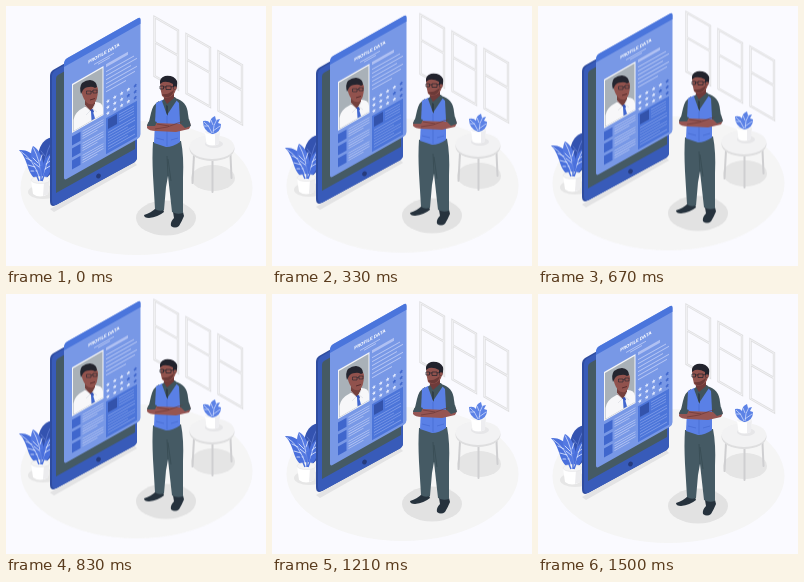
Recreate the animation shown at these times as an HTML page. Size 260 px wide and 260 px high, loop 1.54 s.

```html
<!DOCTYPE html>
<html lang="en">
<head>
<meta charset="utf-8">
<title>Profile data</title>
<style>
html, body { margin: 0; width: 100%; height: 100%; overflow: hidden; background: #fafaff; }
svg { display: block; width: 100vw; height: 100vh; }
</style>
</head>
<body>
<svg viewBox="0 0 260 260">
  <g id="scene">
    <ellipse cx="130.500" cy="182" rx="116" ry="67" fill="#f5f5f5"/>
    <g id="windows" fill="none"></g>

    <!-- shadows -->
    <path d="M44 203l4 3 83-47-3-3z" fill="#e3e3e4"/>
    <ellipse cx="37" cy="186" rx="15" ry="7" fill="#e6e6e6"/>
    <ellipse cx="207" cy="172" rx="22" ry="13" fill="#e5e5e5"/>
    <ellipse cx="160" cy="212" rx="30" ry="17.500" fill="#e2e2e2"/>

    <!-- left plant -->
    <g stroke-linecap="round" fill="none">
      <path d="M36 172C29 160 30 137 43 132q3-1 5 0v30q-4 8-9 11z" fill="#3453b0"/>
      <path d="M37 171q1-21 8-34M37 158l-5-5M39 150l-4-5" stroke="#7f99e8" stroke-width=".5"/>
      <path d="M34 174C20 172 24 155 13 144c14-1 22 11 22 30z" fill="#4a70dc"/>
      <path d="M35 174C27 166 22 149 27 140c9 5 13 20 10 34z" fill="#5479e2"/>
      <path d="M36 174C34 163 37 153 45 147c4 8 1 20-7 27z" fill="#4a70dc"/>
      <path d="M34 173Q28 154 15 145.500M36 173Q34 154 27.500 142M37.500 172q2-14 6.500-22" stroke="#e4ebff" stroke-width=".7"/>
      <path d="M29 161l-7-2M26 155l-6-3M31 165l-6 0M32 157l-5-5M33 161l-5-4M34 155l2-6M39 163l5-3M40 158l4-3" stroke="#e4ebff" stroke-width=".8"/>
    </g>
    <path d="M25 174l2 14q7 5 15 0l2-14z" fill="#fff"/>
    <path d="M38 176l-1 14q4-1 5-2l2-14z" fill="#ececee"/>
    <ellipse cx="34.500" cy="174" rx="9.500" ry="3.500" fill="#f4f4f5" stroke="#e4e4e6" stroke-width=".6"/>
    <path d="M33 175l-5-12M35 175V160M36 175l4-11" stroke="#4a70dc" stroke-width="1.500" fill="none"/>

    <!-- tablet -->
    <path d="M44 70q0-4 3-6L126 19q5-2 5 3V151q0 4-4 6L50 199q-6 3-6-4z" fill="#2f4c9f"/>
    <path d="M46 70.500q0-4 3-6L126 21q5-2 5 3V151q0 4-4 6L51 198.500q-5 2-5-4z" fill="#385bb9"/>
    <path d="M50 73q0-3 2-4L129 25V143L50 187z" fill="#455a64"/>
    <ellipse cx="92.500" cy="170" rx="2.200" ry="2.600" fill="#263b7c" transform="rotate(25 92.500 170)"/>

    <!-- floating profile sheet, drawn flat and skewed -->
    <g transform="matrix(1 -.566 0 1 58 54)">
      <rect width="76.500" height="120.500" rx="3" fill="#7898e6"/>
      <path d="M0 7V3q0-3 3-3H73.500q3 0 3 3V7z" fill="#4a75dc"/>
      <text x="40" y="17.500" text-anchor="middle" font-family="Inter, Roboto, sans-serif" font-weight="700" font-size="4.500" fill="#fff">PROFILE DATA</text>
      <path d="M30 21.500H50M34 23.500H46" stroke="#c3d0f6" stroke-width=".7"/>
      <g id="sheet"></g>
    </g>

    <!-- portrait -->
    <path d="M66 78L97.500 60V109L66 127z" fill="#f4f5f8"/>
    <path d="M67 79L96.500 62V108.500L67 125.500z" fill="#a9b1b8"/>
    <path d="M67.500 125v-11q1-8 11-13l11-5q7 0 7.500 6v6z" fill="#f7f7f9"/>
    <path d="M79 92l10-2v8l-4 7-6-5z" fill="#74403d"/>
    <path d="M75 83q2-5 9-6 7 0 8 6 0 12-5 15-4 1-7-2-4-5-5-13z" fill="#91524d"/>
    <path d="M75 88q-2-7 1-11 4-3 8-3 7 1 7 7l-2 1q-3-2-6-1-4 0-6 3z" fill="#24252f"/>
    <path d="M80.500 85h4.500v3h-4.500zM87 84h4v3h-4zM85 86l2-1" fill="none" stroke="#24252f" stroke-width=".6"/>
    <path d="M84 94l5-1.500" stroke="#4b2527" stroke-width=".8"/>
    <path d="M84 104l3-1 1 3-2 1z" fill="#2f4fb5"/>
    <path d="M85 106l2-.500 2 7-3.500 2z" fill="#4268cf"/>
    <path d="M79 99l5 6-4 4M89 98l-2 5 4 3" fill="none" stroke="#d5d8df" stroke-width=".6"/>

    <!-- table and its plant -->
    <g stroke="#cfcfd1" stroke-width="2" stroke-linecap="round">
      <path d="M188 149l-1.500 28M206.500 154v32M224.500 149l1 23"/>
    </g>
    <ellipse cx="206" cy="143" rx="22.500" ry="12" fill="#dededf"/>
    <ellipse cx="206" cy="141" rx="22.500" ry="12" fill="#f2f2f3"/>
    <ellipse cx="208" cy="138" rx="9" ry="4" fill="#e6e6e8"/>
    <path d="M199 126l1.500 12q6 3 12 0l1.500-12z" fill="#fff"/>
    <path d="M209 127v12q3 0 4-1l1-12z" fill="#ededf0"/>
    <ellipse cx="206.500" cy="126" rx="7.500" ry="2.500" fill="#f3f3f5"/>
    <path d="M206 128q-9-3-9-13 5-1 7 2 0-5 5-7l1 4 4-1-2 4 3 1q0 8-8 10z" fill="#5c82e6"/>
    <path d="M206 127q-3-8-8-11M207 127q0-8 4-14M207 125l7-5M198 120l5 0M205 114l2 5" stroke="#dbe4ff" stroke-width=".7" fill="none"/>

    <!-- man -->
    <path d="M150 202l7 1 1 3q-6 5-15 6-5 0-5-3 7-2 12-7z" fill="#26323d"/>
    <path d="M167 206l10 0 1 4q-2 5-5 10-4 3-8 0-1-4 3-8z" fill="#26323d"/>
    <path d="M147 136L175 135Q178 150 177 172L177 207Q171 209 166 206L162 170L160 181L158 204Q153 206 149 203L147 170Q146 150 147 136z" fill="#455a64"/>
    <path d="M161 150l1 20M162 153l3 22" stroke="#364951" stroke-width=".7" fill="none"/>
    <path d="M169 92q12 3 13 16l2 13-9 3-7-12z" fill="#40545c"/>
    <path d="M153 95q-6 3-8 12l-3 13 7 3 6-14z" fill="#40545c"/>
    <path d="M150 97l6-3 13-1 4 4 1 19v20q-7 5-14 5l-12-4 1-20z" fill="#5a80e6"/>
    <path d="M156 95l3-3 10-1 2 3-10 15z" fill="#40545c"/>
    <path d="M157 86l11-3 0 9-7 6-3-5z" fill="#703b3a"/>
    <path d="M160 99l2 1 0 10-2-4z" fill="#303f48"/>
    <path d="M161 110v30M150 132l8 2M165 134l7-2" stroke="#4267cf" stroke-width=".6" fill="none"/>
    <path d="M143 116l7 1 24 1 9-3q3 3 0 8l-13 3-20-1q-7 0-9-3 0-4 2-6z" fill="#965552"/>
    <path d="M149 123q13-1 23-6l5-1M151 118l12 2" stroke="#6b3837" stroke-width=".7" fill="none"/>
    <path d="M141 120q1-5 4-6l6 2-2 4zM174 117l9-4 2 7-6 2z" fill="#40545c"/>
    <path d="M154 76q2-4 9-4 8 0 8 7-1 9-7 12-5 2-8-1-2-7-2-14z" fill="#91524d"/>
    <path d="M154 78q-1-6 5-8 9-1 12 5 1 5-2 9l-2-1 0-5q-5-3-10-2z" fill="#22232d"/>
    <path d="M156 88q5 1 9-2l3-2q-1 5-5 7-5 1-7-3z" fill="#6b3937"/>
    <circle cx="169" cy="82" r="1.700" fill="#91524d"/>
    <path d="M154 80h3.500v3H154zM160 80h5v3.500h-5zM157.500 81h2.500M165 81l3-.500" fill="none" stroke="#22232d" stroke-width=".7"/>
  </g>
</svg>
<script>
const NS = 'http://www.w3.org/2000/svg';
const byId = id => document.getElementById(id);

function add(parent, tag, attrs) {
  const el = document.createElementNS(NS, tag);
  for (const key in attrs) el.setAttribute(key, attrs[key]);
  parent.append(el);
}

// Three wall frames, each a step further along the wall
const wall = byId('windows');
for (let i = 0; i < 3; i++) {
  const x = 148.5 + i * 32, y = 11 + i * 17.3;
  const outline = `M${x} ${y}l23.500 13.500v59l-23.500-13.500zM${x} ${y + 25}l23.500 13.500`;
  add(wall, 'path', { d: outline, stroke: '#dfdfe1', 'stroke-width': 2.4 });
  add(wall, 'path', { d: outline, stroke: '#f2f2f4', 'stroke-width': .9 });
}

const sheet = byId('sheet');
const box = (x, y, width, height, fill) => add(sheet, 'rect', { x, y, width, height, fill });
const pale = '#b9c8f4';

// Text lines beside the portrait
box(42, 28, 22, 3, '#b0c1f3');
for (let i = 0; i < 6; i++) box(42, 35 + i * 4, [28, 31, 25, 31, 29, 20][i], 1, pale);

// Rating stars
const star = (x, y, r) => Array.from({ length: 10 }, (_, i) => {
  const a = i * Math.PI / 5 - Math.PI / 2, d = i % 2 ? r / 2 : r;
  return [x + d * Math.cos(a), y + d * Math.sin(a)];
}).join(' ');
for (let row = 0; row < 3; row++)
  for (let col = 0; col < 5; col++)
    add(sheet, 'polygon', {
      points: star(44 + col * 6.8, 66 + row * 6, 2.1),
      fill: col < 4 - row % 2 ? '#dfe7fd' : '#4067cd'
    });

// Small items below the portrait
for (let i = 0; i < 3; i++) {
  const y = 81 + i * 12;
  box(8, y, 8.5, 9, '#4067cd');
  for (let j = 0; j < 4; j++) box(18.5, y + .5 + j * 2.4, j === 3 ? 15 : 21, .8, pale);
}

// Card
box(42, 82, 31, 36, '#4c75d9');
box(44, 84, 9, 10, '#3353ab');
for (let i = 0; i < 4; i++) box(55, 85 + i * 2.6, 15, .8, '#7f9ce8');
for (let i = 0; i < 7; i++) box(44, 97 + i * 2.8, i % 3 === 2 ? 20 : 27, .8, '#7f9ce8');

// The whole scene rises and falls evenly, at 24 steps a second
const LOOP = 1540, CYCLE = 1500;
const low = 'translateY(0)', high = 'translateY(-5.2px)';
byId('scene').animate([
  { offset: 0, transform: low, easing: 'steps(18)' },
  { offset: CYCLE / 2 / LOOP, transform: high, easing: 'steps(18)' },
  { offset: CYCLE / LOOP, transform: low },
  { offset: 1, transform: low }
], { duration: LOOP, iterations: Infinity, iterationStart: 4 / LOOP });
</script>
</body>
</html>
```
